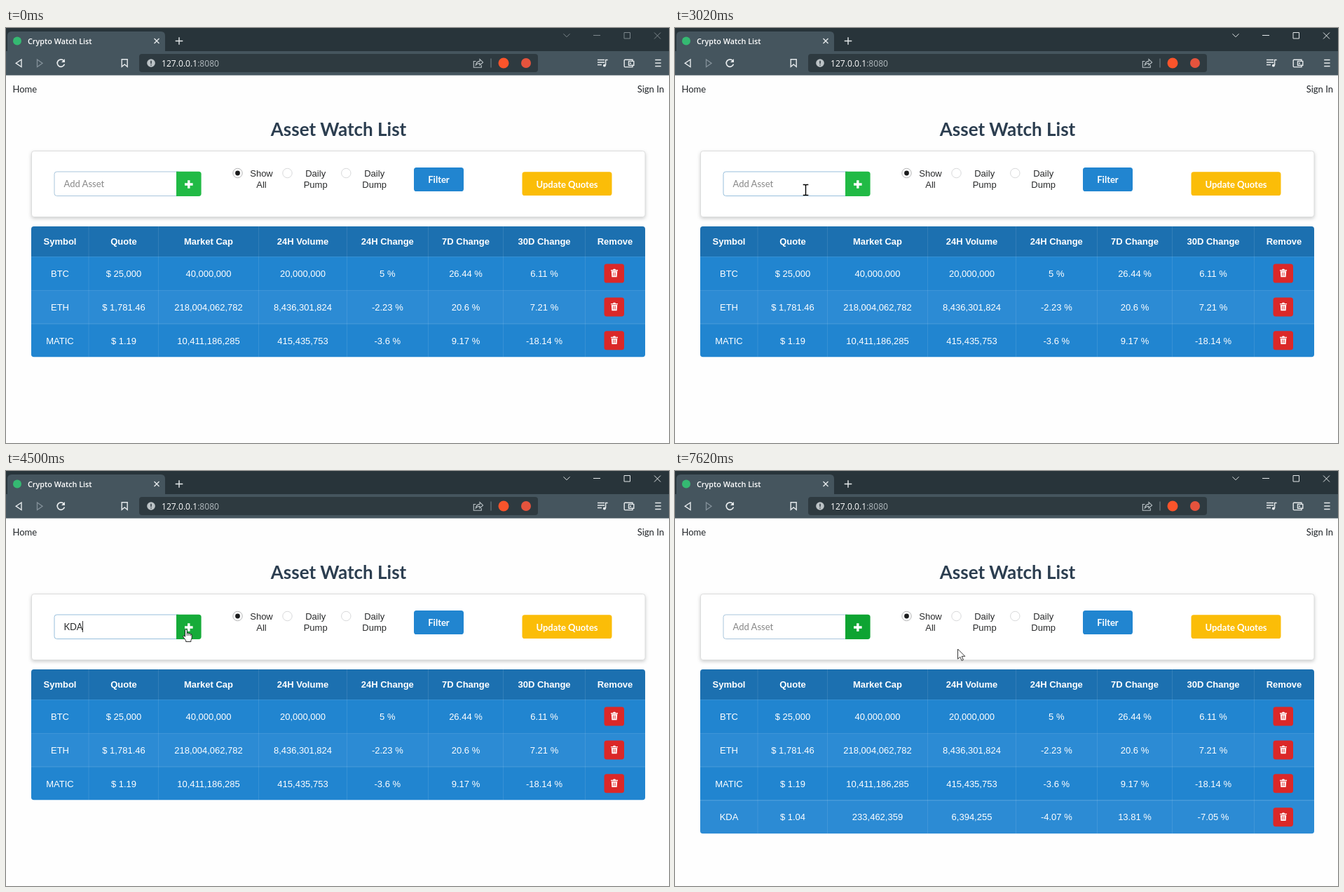
An HTML page that plays this animation: 946 px wide and 592 px high, repeating every 8 s.

```html
<!DOCTYPE html>
<html lang="en">
<head>
<meta charset="utf-8">
<title>Asset Watch List</title>
<style>
html, body { margin: 0; width: 100%; height: 100%; overflow: hidden; background: #fefefe; }
svg { display: block; width: 946px; height: 592px; }
.lato { font: 13px Lato, sans-serif; }
.cell { font: 13px "Liberation Sans", Arial, sans-serif; }
.ui { font: 12.1px "Open Sans", sans-serif; }
.b { font-weight: 700; }
.mid { text-anchor: middle; }
.line { fill: none; stroke: #e6eaec; stroke-width: 1.4; }
</style>
</head>
<body>
<svg id="stage" viewBox="0 0 946 592" xmlns="http://www.w3.org/2000/svg"></svg>
<script>
const LOOP = 8000;
const stage = document.getElementById('stage');

const rect = (x, y, w, h, fill, r = 0, more = '') =>
  `<rect x="${x}" y="${y}" width="${w}" height="${h}" rx="${r}" fill="${fill}" ${more}/>`;
const text = (x, y, s, cls, fill, more = '') =>
  `<text x="${x}" y="${y}" class="${cls}" fill="${fill}" ${more}>${s}</text>`;
const path = (d, more = 'class="line"') => `<path d="${d}" ${more}/>`;
const dot = (x, y, r, fill, more = '') => `<circle cx="${x}" cy="${y}" r="${r}" fill="${fill}" ${more}/>`;

// Browser window
function chrome() {
  return rect(0, 0, 946, 34, '#28343a') + rect(0, 33, 946, 34.5, '#45555e') +
    path('M2 34V11Q2 5 8 5H221Q227 5 227 11V34Z', 'fill="#45555e"') +
    dot(16, 18.5, 6, '#35b972') +
    text(31, 22.5, 'Crypto Watch List', 'ui', '#fff', 'style="font-size:10.8px;font-weight:600"') +
    path('M211.5 15L218.5 22M218.5 15L211.5 22') +
    path('M247 13.2V23.8M241.7 18.5H252.3') +
    path('M22 45V55.5L14.2 50.2Z') +
    path('M44.5 45V55.5L52 50.2Z', 'fill="none" stroke="#84919a" stroke-width="1.3"') +
    path('M82.3 46.6A5.2 5.2 0 1 0 83.4 51.5', 'class="line" style="stroke-width:1.7"') +
    path('M84 44V49H79Z', 'fill="#e6eaec"') +
    path('M165.2 44.7H173.2V55.3L169.2 52L165.2 55.3Z') +
    rect(190, 37, 569, 26, '#2e3a40', 4) +
    dot(207, 50, 5.8, '#bcc3c6') +
    path('M207 46.7V51M207 52.2V53.6', 'stroke="#2e3a40" stroke-width="1.5"') +
    text(222, 54.6, '127.0.0.1<tspan fill="#b3bbbf">:8080</tspan>', 'ui', '#fff') +
    path('M670.5 47.5H667.3V56.3H678.3V53M670.3 53Q671 47.7 676 47.4V44.6L680.6 48.9L676 53V50.4Q672.5 50.3 670.3 53Z',
      'fill="none" stroke="#b9c1c5" stroke-width="1.1"') +
    rect(691.5, 43.5, 1, 13, '#76838a') +
    dot(710, 50, 7.5, '#fb542b') + dot(742, 50, 7, '#e5533d') +
    path('M844 45.5H854M844 49H854M844 52.5H850M855.6 53V45.5H858.6') + dot(853.9, 53.6, 2, '#e6eaec') +
    path('M894 47V45.2H883.2Q882.2 45.2 882.2 46.2V54.6Q882.2 55.6 883.2 55.6H894V53.7M888.5 47.4H895.8V53.2H888.5Z') +
    dot(891, 50.3, 1.1, '#e6eaec') +
    path('M926.2 45.5H934.6M926.2 50H934.6M926.2 54.5H934.6') +
    path('M795.5 8.3L800 12.8L804.5 8.3M838 10.5H848M882 6.5H890.5V15H882ZM925 6.5L934 15.5M934 6.5L925 15.5',
      'id="controls" fill="none" stroke-width="1"');
}

function radio(x, lines, tx, on) {
  return dot(x, 207, 6.7, '#fff', `stroke="${on ? '#b4b5b6' : '#d8d9da'}"`) +
    (on ? dot(x, 207, 3.4, '#1b1c1d') : '') +
    lines.map((s, i) => text(tx, 211.7 + i * 15.8, s, 'cell mid', '#2a2b2c')).join('');
}

function form() {
  return text(9.5, 92, 'Home', 'lato', '#212529') +
    text(939, 92, 'Sign In', 'lato', '#212529', 'text-anchor="end"') +
    text(474.5, 154, 'Asset Watch List', 'lato b mid', '#2c3e50', 'style="font-size:26px"') +
    rect(36.5, 175.5, 875.5, 94, '#fff', 3.6,
      'stroke="#dcdddd" style="filter:drop-shadow(0 2px 2.5px rgba(34,36,38,.22))"') +
    rect(69, 205, 180, 34.5, '#fff', 3.6, 'id="box" stroke-width="1"') +
    path('M243 204.7H275Q278.6 204.7 278.6 208.3V236.3Q278.6 239.9 275 239.9H243Z', 'id="add"') +
    path('M260.8 217.2V228.8M255 223H266.6', 'stroke="#fff" stroke-width="3.4"') +
    text(82.5, 227, '', 'lato', '#000', 'id="entry"') +
    rect(0, 214, 1, 16, '#333', 0, 'id="caret"') +
    radio(330.5, ['Show', 'All'], 364.5, true) +
    radio(401.5, ['Daily', 'Pump'], 441.7) +
    radio(485.3, ['Daily', 'Dump'], 525.7) +
    rect(582, 199, 71, 34, '#2185d0', 3.6) + text(617.5, 220.7, 'Filter', 'lato b mid', '#fff') +
    rect(736.5, 205.3, 128, 33.7, '#fbbd08', 3.6) + text(800.5, 227.5, 'Update Quotes', 'lato b mid', '#fff');
}

// Asset table
const edges = [36, 118, 217.5, 360.5, 486.5, 602.5, 709.5, 826.5];
const mids = [77, 168, 289, 423.5, 544.3, 656, 768, 869];
const heads = ['Symbol', 'Quote', 'Market Cap', '24H Volume', '24H Change', '7D Change', '30D Change', 'Remove'];
const rows = [
  ['BTC', '$ 25,000', '40,000,000', '20,000,000', '5 %', '26.44 %', '6.11 %'],
  ['ETH', '$ 1,781.46', '218,004,062,782', '8,436,301,824', '-2.23 %', '20.6 %', '7.21 %'],
  ['MATIC', '$ 1.19', '10,411,186,285', '415,435,753', '-3.6 %', '9.17 %', '-18.14 %'],
  ['KDA', '$ 1.04', '233,462,359', '6,394,255', '-4.07 %', '13.81 %', '-7.05 %']
];
const ROW = 47.9, TOP = 326;

function bin(y) {
  return rect(853.5, y - 13.5, 28.5, 27, '#db2828', 3.6) +
    path(`M863 ${y - 5}h3l.8 -1.2h2.4l.8 1.2h3v1.4h-10zM863.8 ${y - 2.9}h8.4l-.6 8.2h-7.2z`, 'fill="#fff"') +
    path(`M866.3 ${y - 1.5}v5.2M868 ${y - 1.5}v5.2M869.7 ${y - 1.5}v5.2`, 'stroke="#db2828" stroke-width=".7"');
}

function line(cells, i) {
  const y = TOP + i * ROW, mid = y + 24;
  return rect(36, y, 876, ROW + .1, i % 2 ? '#2c8bd4' : '#2185d0') +
    rect(36, y, 876, 1, '#fff', 0, 'opacity=".09"') +
    cells.map((s, c) => text(mids[c], mid + 4.7, s, 'cell mid', '#fff')).join('') + bin(mid);
}

function table() {
  return '<clipPath id="clip"><rect id="frame" x="36" y="283" width="876" rx="3.8"/></clipPath>' +
    '<g clip-path="url(#clip)">' + rect(36, 283, 876, 43, '#1c70b0') +
    heads.map((s, c) => text(mids[c], 309, s, 'cell b mid', '#fff')).join('') +
    rows.map(line).join('') +
    edges.slice(1).map(x => rect(x - .5, 283, 1, 235, '#fff', 0, 'opacity=".1"')).join('') + '</g>';
}

function overlay() {
  return '<g id="tip">' + path('M136 249H147.5L155.5 241L163.5 249H190.5V289H136Z', 'fill="#2b2b2b"') +
    text(145, 273, 'KDA', 'ui', '#e2e2e2', 'style="font-size:11.6px"') + '</g>' +
    path('M-3.8 -7.5H-1.2Q0 -7.5 0 -6.3Q0 -7.5 1.2 -7.5H3.8M0 -6.5V6.5M-3.8 7.5H-1.2Q0 7.5 0 6.3Q0 7.5 1.2 7.5H3.8',
      'id="beam" fill="none" stroke="#fff" stroke-width="1.4" style="mix-blend-mode:difference"') +
    path('M0 0V14.2L3.3 11.2L5.6 16.4L7.9 15.4L5.7 10.3H10.3Z',
      'id="arrow" fill="#fff" stroke="#222" stroke-width=".9"') +
    '<g id="hand">' + path('M-1.4 1.3Q0 -.9 1.4 1.3V6Q2.8 4.8 4 6.5Q5.4 5.5 6.4 7.2Q8.3 6.7 8.3 9V12.5Q8 14.5 7 16V18H-.2V16.4' +
      'L-4 11.4Q-4.6 9.2 -2.8 9.4L-1.4 10.8Z', 'fill="#fff" stroke="#111" stroke-width=".9"') +
    path('M1.4 6V9.5M4 6.5V9.5M6.4 7.2V9.8', 'stroke="#111" stroke-width=".8"') + '</g>';
}

stage.innerHTML = chrome() + form() + table() + overlay();
const el = {};
stage.querySelectorAll('[id]').forEach(n => el[n.id] = n);
const set = (n, k, v) => el[n].setAttribute(k, v);
const show = (n, on) => set(n, 'visibility', on ? 'visible' : 'hidden');
const within = (t, a, b) => t >= a && t < b;

// Pointer moves: start, end, steps, from, to, easing of x and y
const out = n => p => 1 - (1 - p) ** n;
const smooth = p => p * p * (3 - 2 * p);
const moves = [
  [430, 580, 3, [763, 658], [546.5, 445], out(1), out(1)],
  [1040, 1770, 12, [546.5, 445], [186.5, 231], out(3.2), out(3.55)],
  [4100, 4630, 9, [186.5, 231], [260, 225.2], out(2.1), out(2.1)],
  [7280, 7620, 6, [260, 225.2], [403.5, 254], smooth, smooth]
];

function pointer(t) {
  let pos = moves[0][3];
  for (const [a, b, n, from, to, ex, ey] of moves) {
    if (t < a) break;
    const k = Math.floor((t - a + 4) / ((b - a) / (n - 1))) + 1;
    const p = Math.min(1, k / n);
    pos = [from[0] + (to[0] - from[0]) * ex(p), from[1] + (to[1] - from[1]) * ey(p)];
  }
  return pos;
}

function shape(x, y) {
  if (y > 204 && y < 240 && x > 69 && x < 279) return x < 243 ? 'beam' : 'hand';
  const overRow = y > TOP && y < 470 && Math.abs((y - TOP) % ROW - 24) < 8;
  return overRow && mids.some(m => Math.abs(x - m) < 22) ? 'beam' : 'arrow';
}

function draw(t) {
  const [x, y] = pointer(t), kind = shape(x, y);
  for (const k of ['beam', 'arrow', 'hand']) show(k, k === kind);
  set(kind, 'transform', `translate(${x} ${y})`);

  const typed = within(t, 3220, 6420), focus = within(t, 2430, 5620);
  el.entry.textContent = typed ? 'KDA' : 'Add Asset';
  set('entry', 'fill', typed ? '#2b2c2d' : '#878787');
  set('caret', 'x', typed ? 109 : 82);
  show('caret', focus && !within(t, 3020, 3220) && !within(t, 3880, 4370) && !within(t, 4960, 5420));
  set('box', 'stroke', focus ? '#98bfdc' : '#a9c6dc');
  set('add', 'fill', t >= 5620 ? '#0ea432' : kind === 'hand' ? '#16ab39' : '#21ba45');
  set('controls', 'stroke', t < 2560 ? '#7d878c' : '#e3e7e9');
  set('tip', 'opacity', within(t, 3290, 3490) ? .53 : within(t, 3490, 3560) ? .25 : 0);
  set('frame', 'height', t < 6420 ? 186.3 : 234.3);
}

function tick() {
  draw(performance.now() % LOOP);
  requestAnimationFrame(tick);
}
tick();
</script>
</body>
</html>
```
